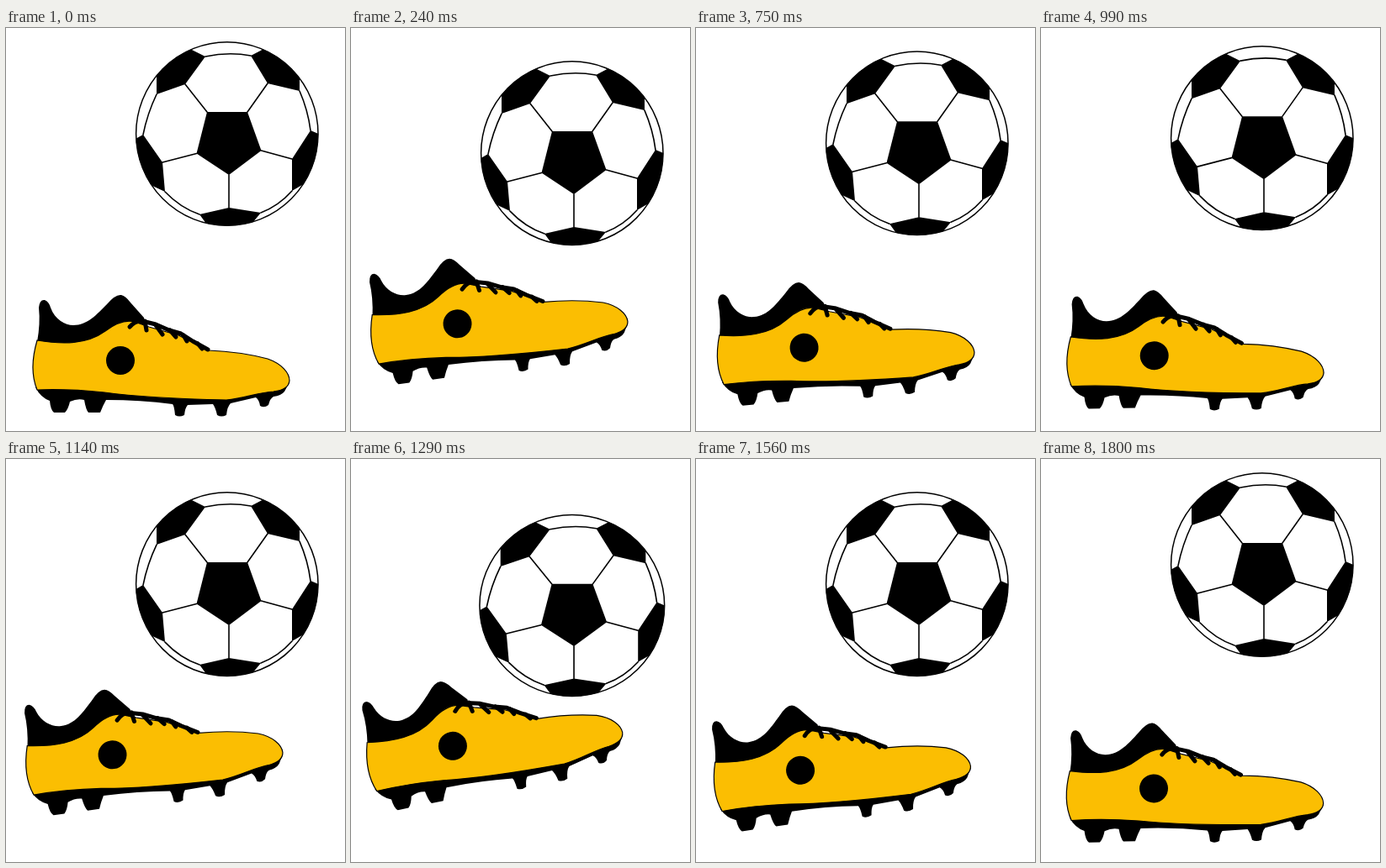
An HTML page that plays this animation: 403x480 px, repeating every 1.83 s.

```html
<!DOCTYPE html>
<html lang="en">
<head>
<meta charset="utf-8">
<title>Football boot and ball</title>
<style>
  html, body { margin: 0; width: 100%; height: 100%; overflow: hidden; background: #fff; }
  svg { display: block; width: 100%; height: 100%; }
  .line { fill: none; stroke: #000; stroke-linecap: round; stroke-linejoin: round; }
</style>
</head>
<body>
<svg viewBox="0 0 403 480">
  <defs>
    <clipPath id="round"><ellipse cx="262.8" cy="126" rx="108.5" ry="109.6"/></clipPath>
  </defs>

  <g id="boot">
    <!-- collar -->
    <path d="M37 374 Q41 352 39 333 Q40 323 46 324 Q51 326 53 333 C58 347 70 354 80 354 C97 354 108 341 120 329
             Q130 317 137 318 Q142 319 148 327 L164 345 L166 362 L130 380 L70 388 Z"/>
    <!-- sole and studs -->
    <path d="M35 428 Q41 440 52 444 Q53 455 57 458 H70 Q74 454 76 445 Q85 441 93 443 Q95 455 98 458 H112
             Q115 450 119 443 Q160 443 198 448 Q200 450 201 461 Q206 464 212 461 Q213 452 216 449 L246 448
             Q249 452 251 461 Q256 464 262 461 Q263 451 267 447 L297 440 Q301 443 302 450 Q307 453 312 449
             Q314 441 318 439 Q327 438 331 433 L337 422 L300 425 Z"/>
    <!-- upper -->
    <path d="M37 372 C68 377 96 377 118 361 C130 352 141 347 153 350 L170 356 L205 366 L241 384
             C266 385 292 389 311 394 C328 400 337 411 337 420 Q336 431 318 433 C300 434 284 441 262 443
             C212 442 160 440 117 434 C88 431 64 430 37 431 C30 414 30 396 37 372 Z"
          fill="#fbbe02" stroke="#000" stroke-width="1.2"/>
    <!-- laces -->
    <g class="line" stroke-width="5">
      <path d="M147 356Q154 348 162 349L178 353L194 360L208 364L222 373L240 383"/>
      <path d="M165 349l2 11M178 354l8 11M195 360l7 8M211 366l4 7M228 376l5 6"/>
    </g>
    <circle cx="136" cy="396" r="17"/>
  </g>

  <g id="ball">
    <ellipse cx="262.8" cy="126" rx="108.2" ry="109.3" fill="#fff"/>
    <g clip-path="url(#round)">
      <path d="M239 100H287L303.5 146L265 175L226.5 149.5Z
               M179 79L213 67L237 34L217 24L179 10Z
               M291 33L311 66L349 75V10L312 22Z
               M163 127L186 160L189 195L172 187L140 190V140Z
               M362 122L340 156V194L357 184L390 170V134Z
               M230 222L265 214L303 220L293 232L265 250L238 233Z"/>
      <path class="line" stroke-width="1.6"
            d="M239 100L213 67M287 100L311 66M303.5 146L340 156M265 175V214M226.5 149.5L186 160
               M237 34Q265 28 291 33M179 79Q168 102 163 127M349 75Q359 98 362 122
               M189 195Q207 214 230 222M340 194Q324 212 303 220"/>
    </g>
    <ellipse class="line" cx="262.8" cy="126" rx="108.2" ry="109.3" stroke-width="1.5"/>
  </g>
</svg>

<script>
  const LOOP = 1830, STEP = 30, BOUNCE = 900, HIT = BOUNCE / 2, LIFT = 355;
  const boot = document.getElementById('boot');
  const ball = document.getElementById('ball');

  // boot poses
  const rest = { x: 0, y: 0, angle: 0 };
  const raised = { x: -19, y: -60, angle: -9.5 };
  const kick = { x: -37, y: -62, angle: -16.3 };
  const settled = { x: -3.3, y: -4.7, angle: -1.8 };

  const easeInOut = p => p ** 3 * (6 * p * p - 15 * p + 10);
  const easeIn = p => p ** 1.3;
  const easeOut = p => 1 - easeIn(1 - p);

  function mix(a, b, f) {
    const at = key => a[key] + (b[key] - a[key]) * f;
    return { x: at('x'), y: at('y'), angle: at('angle') };
  }

  function bootPose(u) {
    if (u < LIFT) return mix(rest, raised, easeInOut(u / LIFT));
    if (u < HIT) return mix(raised, kick, easeIn((u - LIFT) / (HIT - LIFT)));
    return mix(kick, settled, easeOut((u - HIT) / (BOUNCE - HIT)));
  }

  function draw(now) {
    const t = Math.floor((now % LOOP) / STEP) * STEP;
    const u = t > BOUNCE ? t - BOUNCE : t;

    const { x, y, angle } = bootPose(Math.min(u, BOUNCE));
    boot.setAttribute('transform', `translate(${x} ${y}) rotate(${angle} 172.3 354.7)`);

    const fall = 1 - Math.abs(1 - u / HIT);
    const drop = 60.4 * fall ** 1.53;
    const squash = 0.06 * Math.max(0, (fall - 0.82) / 0.18);
    ball.setAttribute('transform',
      `translate(262.8 ${126 + drop}) scale(${1 + squash} ${1 - 0.8 * squash}) translate(-262.8 -126)`);
  }

  const start = performance.now();
  function tick() {
    draw(performance.now() - start);
    requestAnimationFrame(tick);
  }
  tick();
</script>
</body>
</html>
```
